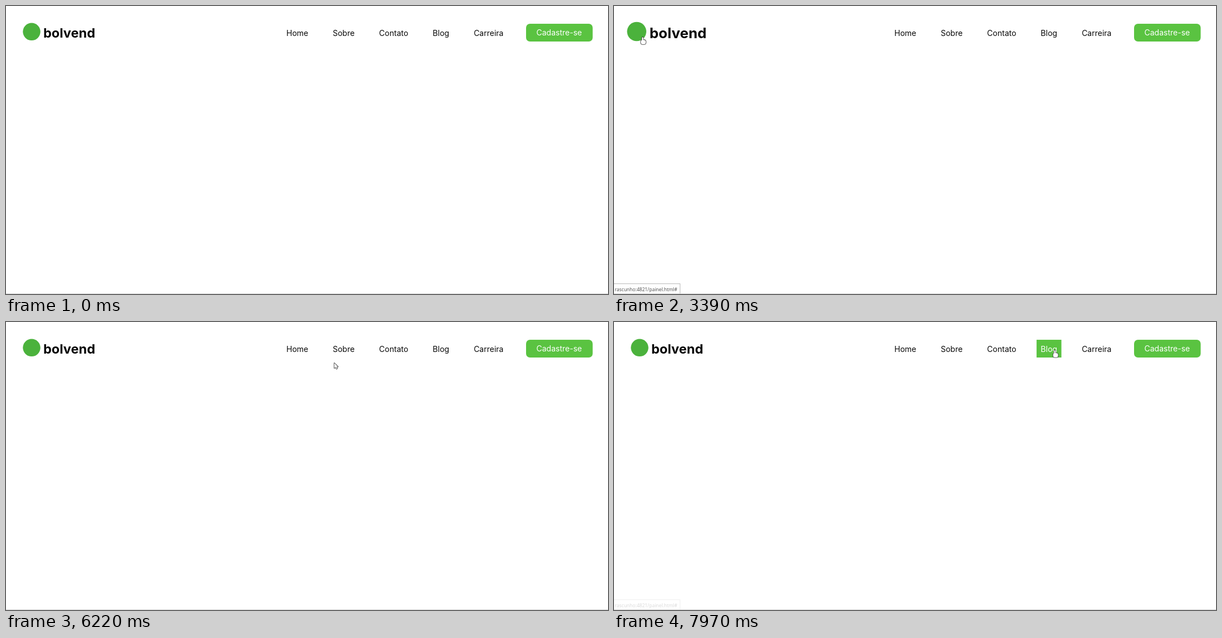
Write an HTML page with a canvas that moves like this. It is 1080 px wide and 519 px high and loops after 8000 ms.

```html
<!DOCTYPE html>
<html lang="pt-BR">
<head>
<meta charset="utf-8">
<title>Menu</title>
<style>
  html, body { margin: 0; width: 100%; height: 100%; overflow: hidden; background: #fff; }
  canvas { display: block; width: 100vw; height: 100vh; }
</style>
</head>
<body>
<canvas id="stage" width="1080" height="519"></canvas>
<script>
const LOOP = 8000;
const GREEN = '#5ac341';
const NAV_FONT = '400 14px Inter, sans-serif';
const ctx = document.getElementById('stage').getContext('2d');

const hovers = [
  { item: 'logo', from: 1860, to: 3460 },
  { item: 'Home', from: 5180, to: 5750 },
  { item: 'Sobre', from: 6340, to: 6720 },
  { item: 'Blog', from: 7948, to: LOOP }
];

// Each move bends from the previous end, past "via", to "end".
const entry = [900, 503];
const moves = [
  { from: 70, to: 740, via: [560, 290], end: [245, 187] },
  { from: 1010, to: 1860, via: [6, 92], end: [51.5, 56] },
  { from: 3390, to: 4010, via: [20, 110], end: [437, 162] },
  { from: 4360, to: 5260, via: [514, 43], end: [516, 54] },
  { from: 5720, to: 6400, via: [570, 104], end: [612, 55] },
  { from: 6700, to: 7300, via: [746, 60], end: [738, 69] },
  { from: 7550, to: 7970, via: [766, 72], end: [791, 51] }
];

const arrow = new Path2D('M0 0V9.2L2.1 7.2 3.7 10.7 5.2 10 3.7 6.7H6.6Z');
const hand = new Path2D();
hand.roundRect(-1.2, 0, 2.4, 8, 1.2);
hand.roundRect(-3.2, 5, 8.8, 7.8, 3);

const ramp = (t, from, to) => Math.max(0, Math.min(1, (t - from) / (to - from)));
const ease = p => p * p * (3 - 2 * p);

function write(text, x, y, font, color) {
  ctx.font = font;
  ctx.fillStyle = color;
  ctx.fillText(text, x, y);
}

function pointerAt(t) {
  let spot = entry;
  for (const { from, to, via, end } of moves) {
    if (t < from) break;
    const p = ramp(t, from, to);
    const q = 1 - p;
    spot = spot.map((a, i) => q * q * a + 2 * p * q * via[i] + p * p * end[i]);
  }
  return spot;
}

function drawLogo(t) {
  const { from, to } = hovers[0];
  const scale = 1 + 0.1 * (ease(ramp(t, from, from + 300)) - ease(ramp(t, to, to + 300)));
  ctx.save();
  ctx.translate(99, 49);
  ctx.scale(scale, scale);
  ctx.translate(-99, -49);
  ctx.fillStyle = '#4bb23c';
  ctx.beginPath();
  ctx.arc(46, 46.3, 15.7, 0, Math.PI * 2);
  ctx.fill();
  write('bolvend', 67, 57, '700 23.5px Inter, sans-serif', '#050505');
  ctx.restore();
}

function drawMenu(active) {
  let x = 503;
  for (const label of ['Home', 'Sobre', 'Contato', 'Blog', 'Carreira']) {
    ctx.font = NAV_FONT;
    const width = ctx.measureText(label).width;
    if (label === active) {
      ctx.fillStyle = GREEN;
      ctx.fillRect(x - 7.5, 32, width + 15, 32);
    }
    write(label, x, 53.5, NAV_FONT, label === active ? '#fff' : '#080808');
    x += width + 44;
  }
  ctx.fillStyle = GREEN;
  ctx.beginPath();
  ctx.roundRect(933, 32, 119.5, 32, 7);
  ctx.fill();
  write('Cadastre-se', 951.5, 53, NAV_FONT, '#fff');
}

// The address bubble follows each hover and lingers after it.
function drawBubble(t) {
  ctx.globalAlpha = Math.max(...hovers.map(({ from, to }) =>
    ramp(t, from + 10, from + 70) - ramp(t, to + 50, to + 320)));
  ctx.fillStyle = '#fff';
  ctx.fillRect(0, 500, 119, 18);
  ctx.strokeStyle = '#b9b9b9';
  ctx.lineWidth = 1;
  ctx.strokeRect(-1, 500.5, 119.5, 20);
  write('rascunho:4821/painel.html#', 1.5, 513.5, '8.5px "Open Sans", sans-serif', '#484848');
  ctx.globalAlpha = 1;
}

function drawPointer(t, shape) {
  if (t < moves[0].from) return;
  ctx.save();
  ctx.translate(...pointerAt(t));
  ctx.strokeStyle = '#333';
  ctx.fillStyle = '#fff';
  ctx.lineWidth = 1.6;
  ctx.lineJoin = 'round';
  ctx.stroke(shape);
  ctx.fill(shape);
  ctx.restore();
}

function draw(t) {
  const hover = hovers.find(({ from, to }) => t >= from && t < to);
  ctx.fillStyle = '#fff';
  ctx.fillRect(0, 0, 1080, 519);
  drawLogo(t);
  drawMenu(hover?.item);
  drawBubble(t);
  ctx.fillStyle = '#d2d2d2';
  ctx.fillRect(0, 518, 1080, 1);
  drawPointer(t, hover ? hand : arrow);
}

const start = performance.now();
function tick() {
  draw((performance.now() - start) % LOOP);
  requestAnimationFrame(tick);
}
tick();
</script>
</body>
</html>
```
